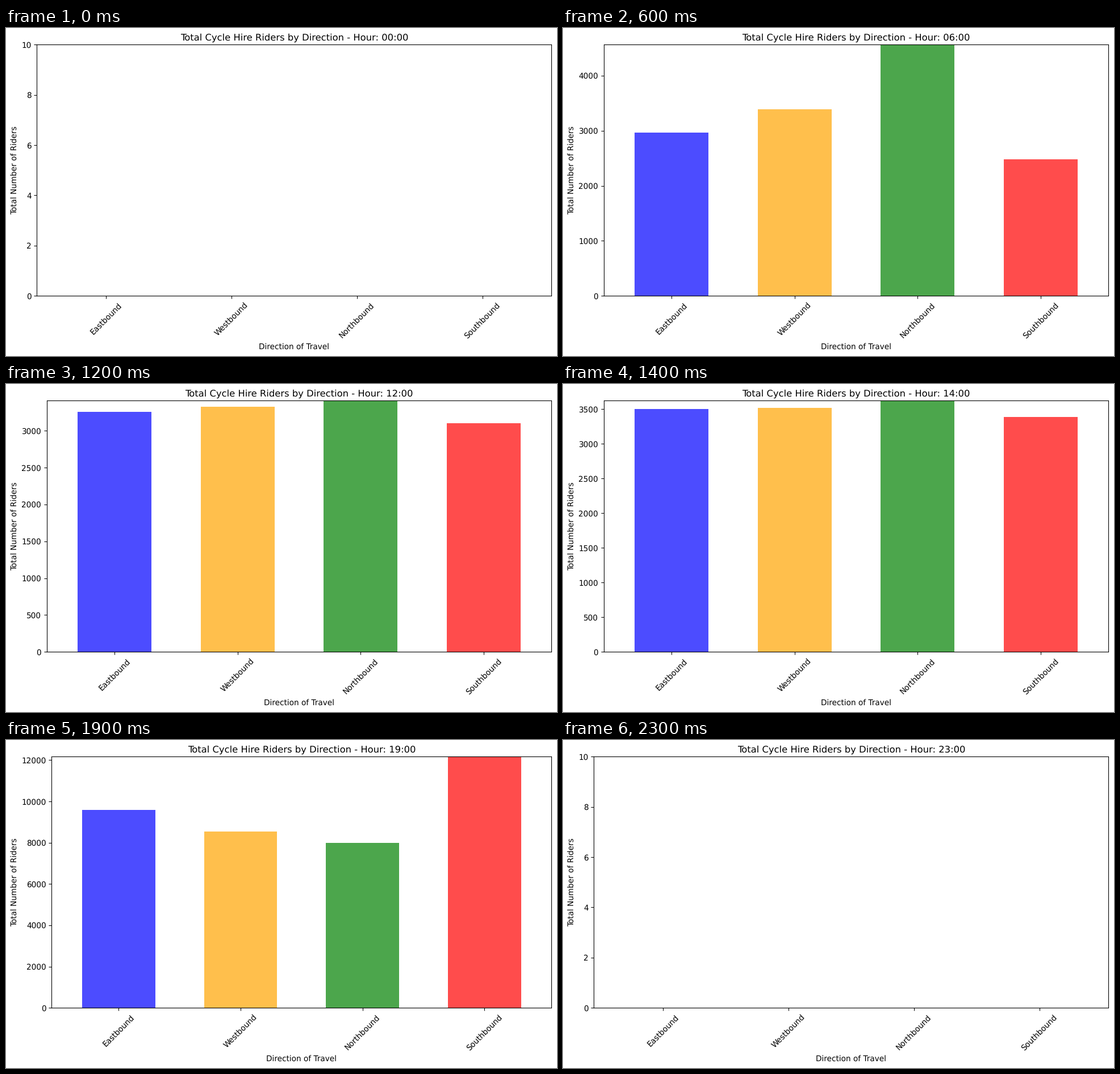
Write a matplotlib script that moves like this. It is 970 by 577 pixels and loops after 2400 ms.

```python
import matplotlib.pyplot as plt
import numpy as np
from matplotlib.animation import FuncAnimation

W, H, DPI = 970, 577, 98
RIGHT, TOP, BOTTOM = 960.4, 29.4, 471.2
FIRST_HOUR, LAST_HOUR = 6, 21

# Name, colour, midday level, then size and hour of the two rush peaks.
DIRECTIONS = [
    ("Eastbound", "blue", 3455, 13535, 7.883, 12257, 17.931),
    ("Westbound", "orange", 3520, 18440, 7.980, 10658, 17.966),
    ("Northbound", "green", 3605, 24916, 7.976, 10348, 17.893),
    ("Southbound", "red", 3290, 13982, 8.008, 15368, 17.975),
]

plt.rcParams.update({"font.family": "DejaVu Sans", "text.hinting": "none"})
names, colors = list(zip(*DIRECTIONS))[:2]
spots = range(len(names))
fig = plt.figure(figsize=((W + 0.01) / DPI, (H + 0.01) / DPI), dpi=DPI)
ax = fig.add_axes([0.1, 0.2, 0.8, 0.7])
bars = ax.bar(spots, [0] * len(names), width=0.6, color=colors, alpha=0.7)
ax.set_xlim(-0.55, 3.55)
ax.set_xticks(spots, names, rotation=45)
ax.set_xlabel("Direction of Travel")
ax.set_ylabel("Total Number of Riders")


def bell(hour, center, width):
    return np.exp(-((hour - center) / width) ** 2)


def riders(hour, midday, morning, am, evening, pm):
    """A broad daytime level with a morning and an evening rush on top."""
    if not FIRST_HOUR <= hour <= LAST_HOUR:
        return 0
    return (midday * bell(hour, 13, 4)
            + morning * bell(hour, am, 1.5)
            + evening * bell(hour, pm, 2))


def fit_axes(digits):
    """Leave room on the left for tick labels of this many digits."""
    left = 37.1 + 8.65 * digits
    ax.set_position([left / W, 1 - BOTTOM / H,
                     (RIGHT - left) / W, (BOTTOM - TOP) / H])


def update(hour):
    counts = [riders(hour, *params) for _, _, *params in DIRECTIONS]
    limit = max(counts) or 10
    for bar, count in zip(bars, counts):
        bar.set_height(count)
    ax.set_ylim(0, limit)
    fit_axes(len(str(int(limit))))
    ax.set_title(f"Total Cycle Hire Riders by Direction - Hour: {hour:02d}:00")
    return bars


anim = FuncAnimation(fig, update, frames=24, interval=100, repeat=True)
plt.show()
```
